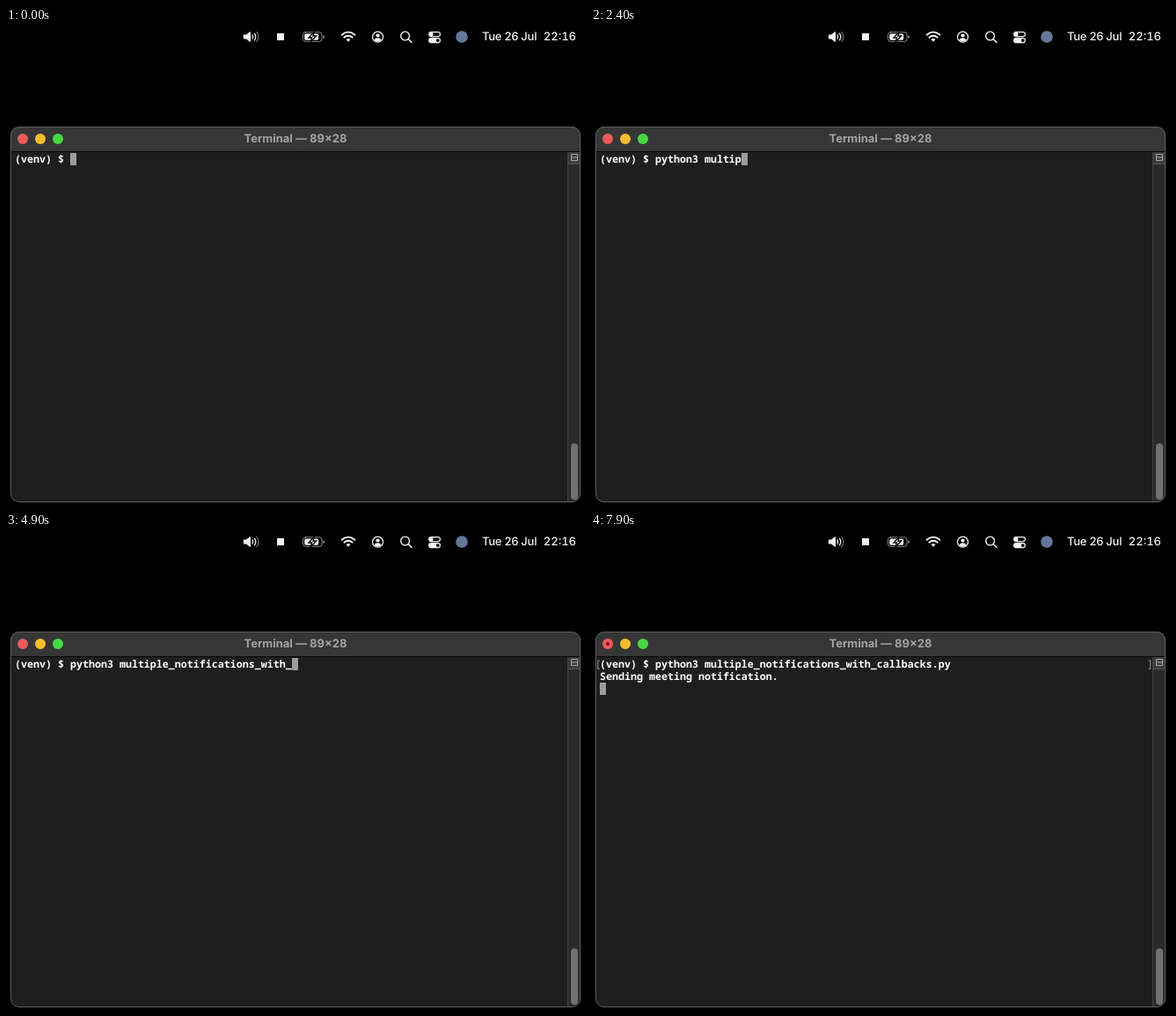
An HTML page for the animation above (8 s loop, 658 px wide and 542 px high).

```html
<!DOCTYPE html>
<html lang="en">
<head>
<meta charset="utf-8">
<title>Terminal</title>
<style>
  html, body { margin: 0; width: 100%; height: 100%; overflow: hidden; background: #000; }
  svg { display: block; width: 658px; height: 542px; }
  text { white-space: pre; text-rendering: geometricPrecision; }
  .ui { font: 500 13px Inter, sans-serif; fill: #f2f2f2; }
  .title { font: 700 13px Inter, sans-serif; fill: #a3a3a3; text-anchor: middle; }
  .mono { font: 600 11.667px "Noto Sans Mono", monospace; fill: #fff; }
  .mark { font-weight: 400; fill: #9a9a9a; }
  .line { fill: none; stroke: #f2f2f2; stroke-linecap: round; stroke-linejoin: round; }
  .solid { fill: #f2f2f2; }
</style>
</head>
<body>
<svg viewBox="0 0 658 542">
  <defs>
    <clipPath id="frame"><rect x="5" y="112" width="648" height="427" rx="10"/></clipPath>
  </defs>
  <rect width="658" height="542"/>

  <!-- volume -->
  <path class="solid" d="M270.5 7.6h2.6l4-3.3q.9-.5.9.5v10.4q0 1-.9.5l-4-3.3h-2.6q-.6 0-.6-.6V8.2q0-.6.6-.6z"/>
  <g class="line" stroke-width="1.3">
    <path d="M280 7.8q1.5 2.2 0 4.4"/>
    <path d="M282.4 6.2q2.7 3.8 0 7.6"/>
    <path d="M284.9 4.6q4 5.4 0 10.8" opacity=".45"/>
  </g>

  <rect class="solid" x="308" y="6" width="8" height="8"/>

  <!-- battery -->
  <rect class="line" x="337.5" y="4.8" width="21.5" height="10.6" rx="3" opacity=".55"/>
  <path class="solid" d="M360.4 8.2q1.8.6 1.8 1.9t-1.8 1.9z" opacity=".6"/>
  <rect class="solid" x="339.2" y="6.5" width="16" height="7.2" rx="1.6"/>
  <path d="M350.3 4.2l-6.3 6.8h3.6l-1.4 5 6.4-7h-3.7z" fill="#f2f2f2" stroke="#000" stroke-width="1.3"/>

  <!-- wireless -->
  <g class="line" stroke-width="1.8" stroke-linecap="butt">
    <path d="M381.6 7.8q7.4-6.4 14.8 0"/>
    <path d="M384.3 10.7q4.7-4 9.4 0"/>
  </g>
  <path class="solid" d="M386.5 13q2.5-2 5 0l-2.5 2.7z"/>

  <!-- user -->
  <circle class="line" cx="422.5" cy="10.2" r="6" stroke-width="1.2"/>
  <circle class="solid" cx="422.5" cy="8.5" r="2.1"/>
  <path class="solid" d="M418.4 14q1-2.7 4.1-2.7t4.1 2.7q-4.1 2.8-8.2 0z"/>

  <!-- search -->
  <circle class="line" cx="453.6" cy="9" r="4.9" stroke-width="1.4"/>
  <path class="line" d="M457.3 12.7l3.7 3.6" stroke-width="1.6"/>

  <!-- switches -->
  <rect class="line" x="480.6" y="4.6" width="12.8" height="5" rx="2.5" stroke-width="1.2"/>
  <circle class="solid" cx="483.2" cy="7.1" r="2.4"/>
  <rect class="solid" x="480" y="11" width="14" height="6.2" rx="3.1"/>
  <circle cx="490.8" cy="14.1" r="1.9"/>

  <circle cx="518" cy="10" r="6.8" fill="#66789a"/>

  <text class="ui" x="541" y="14.4" letter-spacing="-.25">Tue 26 Jul</text>
  <text class="ui" x="648" y="14.4" text-anchor="end" style="font-variant-numeric: tabular-nums">22:16</text>

  <!-- window -->
  <g clip-path="url(#frame)">
    <rect x="5" y="112" width="648" height="427" fill="#1e1e1e"/>
    <rect x="5" y="112" width="648" height="28" fill="#363636"/>
    <rect x="5" y="140" width="648" height="1" fill="#060606"/>
    <rect x="638" y="141" width="15" height="398" fill="#2a2a2a"/>
    <rect x="638" y="141" width="1" height="398" fill="#424242"/>
    <rect x="639" y="141" width="14" height="13" fill="#3c3c3c"/>
    <rect x="638" y="154" width="15" height="1" fill="#555"/>
    <path d="M642.5 143.5h7v7h-7zM642.5 147h7" fill="none" stroke="#a8a8a8"/>
    <rect x="642" y="472" width="8" height="64" rx="4" fill="#717171"/>
  </g>
  <rect x="5.5" y="112.5" width="647" height="426" rx="9.5" fill="none" stroke="#5c5c5c"/>
  <circle cx="19" cy="126" r="6" fill="#ee5a5b"/>
  <circle id="busy" cx="19" cy="126" r="2" fill="#7a0d10"/>
  <circle cx="39" cy="126" r="6" fill="#f5bd30"/>
  <circle cx="59" cy="126" r="6" fill="#47d843"/>
  <text class="title" x="329" y="130.4">Terminal — 89×28</text>

  <g id="marks">
    <text class="mono mark" x="4.5" y="153">[</text>
    <text class="mono mark" x="632" y="153">]</text>
  </g>
  <rect id="cursor" width="7" height="14" fill="#9c9c9c"/>
  <text id="command" class="mono" x="10" y="153"></text>
  <text id="output" class="mono" x="10" y="167">Sending meeting notification.</text>
</svg>
<script>
  const LOOP = 8000, KEY = 100, CELL = 7, ROW = 14, LEFT = 10, TOP = 142;
  const ENTER = 7500, BUSY = 7600, REPLY = 7700;
  const prompt = '(venv) $ ';

  // Bursts of typing: start time, then one key every KEY ms.
  const bursts = [
    [200, 'python'], [900, '3 '], [1500, 'm'], [1700, 'u'], [2000, 'lti'],
    [2400, 'ple_'], [2900, 'notifica'], [3600, 't'], [3700, 'ions'],
    [4200, '_'], [4400, 'w'], [4400, 'i'], [4600, 't'], [4600, 'h'],
    [4900, '_callb'], [5600, 'acks.'], [6200, 'p'], [6400, 'y']
  ];

  const el = id => document.getElementById(id);
  const [busy, marks, cursor, command, output] =
    ['busy', 'marks', 'cursor', 'command', 'output'].map(el);
  const show = (node, on) => node.setAttribute('visibility', on ? 'visible' : 'hidden');

  function typed(t) {
    return bursts.map(([start, keys]) =>
      keys.slice(0, Math.max(0, Math.floor((t - start) / KEY) + 1))).join('');
  }

  function draw(t) {
    const line = prompt + typed(t);
    const row = t >= REPLY ? 2 : t >= ENTER ? 1 : 0;
    command.textContent = line;
    cursor.setAttribute('x', LEFT + (row ? 0 : line.length * CELL));
    cursor.setAttribute('y', TOP + row * ROW);
    show(marks, t >= ENTER);
    show(busy, t >= BUSY);
    show(output, t >= REPLY);
  }

  const begin = performance.now();
  function tick() {
    draw((performance.now() - begin) % LOOP);
    requestAnimationFrame(tick);
  }
  tick();
</script>
</body>
</html>
```
